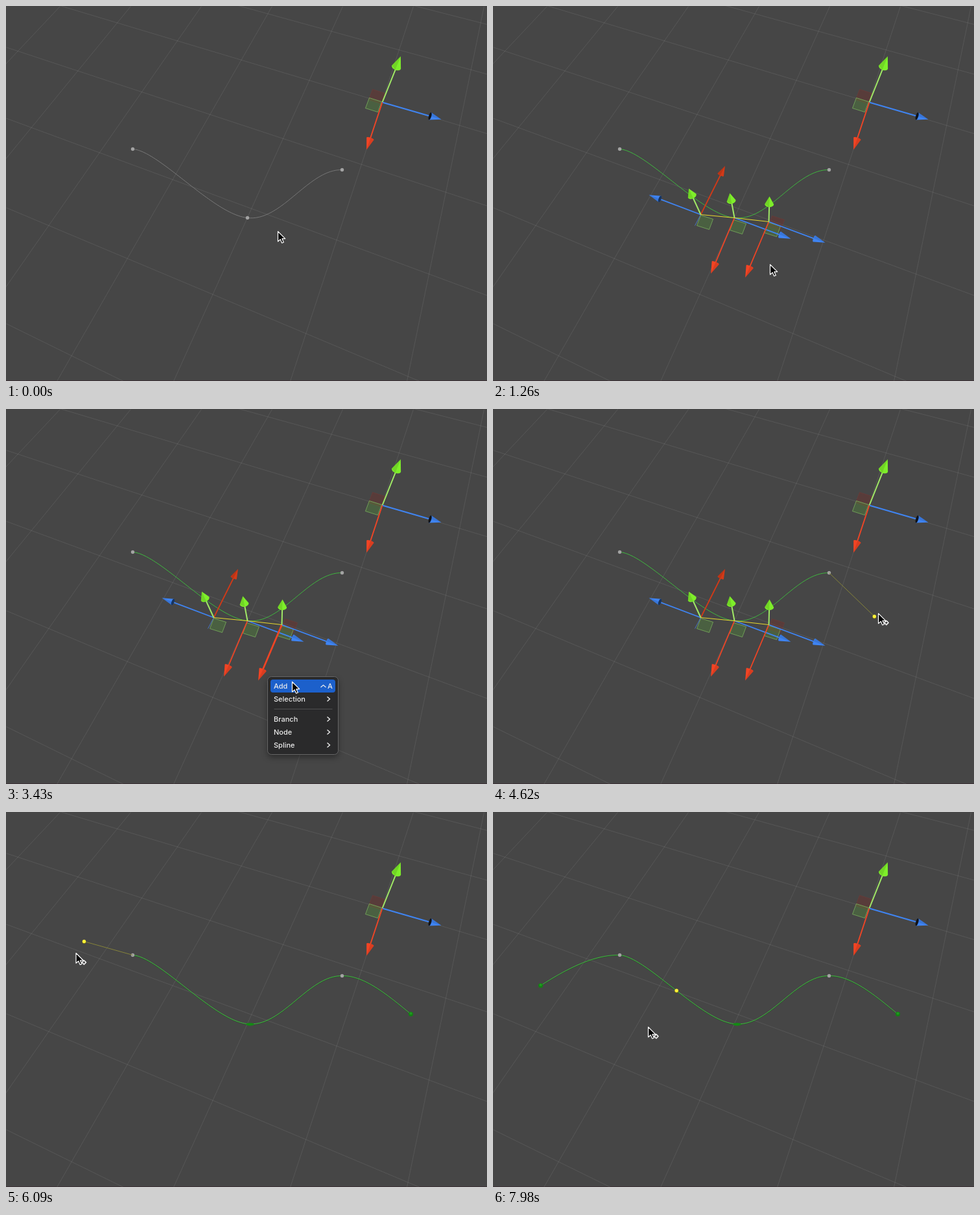
Animation, 742 px wide and 578 px high, one loop 8000 ms. Source, as an HTML page with a canvas:

```html
<!DOCTYPE html>
<html lang="en">
<head>
<meta charset="utf-8">
<title>Spline editor</title>
<style>
  html, body { margin: 0; width: 100%; height: 100%; overflow: hidden; background: #464646; }
  canvas { display: block; }
</style>
</head>
<body>
<canvas id="stage" width="742" height="578"></canvas>
<script>
const ctx = document.getElementById('stage').getContext('2d');
const LOOP = 8000, STEP = 70;
const SELECT = 1190, HOVER = 1610, MENU_OPEN = 2030, MENU_HOVER = 2520,
      ADD_MODE = 4060, ADD_END = 5250, ADD_START = 6650;
const GREEN = '#7eee2a', RED = '#f24424', BLUE = '#3f84f2';

// Spline nodes from left to right; the middle one shows its two tangent handles.
const first = [73, 267], left = [195, 220], middle = [372, 326], right = [518, 252], last = [624, 311];
const handleIn = [320, 321], handleOut = [425, 332];
const pieces = [
  [first, [112, 242], [155, 219], left],
  [left, [236, 223], handleIn, middle],
  [middle, handleOut, [466, 251], right],
  [right, [552, 251], [590, 283], last]
];

// Pointer moves: start, end, destination. Each one eases out.
const pointerStart = [419, 347];
const moves = [
  [0, 70, [423, 331]],
  [140, 490, [317, 261]],
  [490, 1050, [439, 402]],
  [1120, 1260, [427, 398]],
  [1470, 1680, [398, 396]],
  [2310, 2870, [441, 420]],
  [3570, 3780, [449, 421]],
  [3990, 4760, [599, 311]],
  [4760, 5110, last],
  [5530, 5880, [120, 199]],
  [6020, 6510, first],
  [6860, 7420, [288, 331]],
  [7420, 7980, [239, 331]]
];

const add = (p, q, scale = 1) => [p[0] + q[0] * scale, p[1] + q[1] * scale];
const distance = (p, q) => Math.hypot(p[0] - q[0], p[1] - q[1]);

function pointer(t) {
  let at = pointerStart;
  for (const [start, end, to] of moves) {
    if (t <= start) break;
    const rest = 1 - Math.min(1, (t - start) / (end - start));
    at = add(to, add(at, to, -1), rest * rest);
  }
  return at;
}

const visiblePieces = t => pieces.slice(t >= ADD_START ? 0 : 1, t >= ADD_END ? 4 : 3);

function bezier(piece, k) {
  const weights = [(1 - k) ** 3, 3 * k * (1 - k) ** 2, 3 * k * k * (1 - k), k ** 3];
  return piece.reduce((sum, p, i) => add(sum, p, weights[i]), [0, 0]);
}

function sampleSpline(t, perPiece = 60) {
  const visible = visiblePieces(t), points = [];
  for (let i = 0; i <= visible.length * perPiece; i++) {
    const n = Math.min(visible.length - 1, Math.floor(i / perPiece));
    points.push(bezier(visible[n], i / perPiece - n));
  }
  return points;
}

function path(points, closed) {
  ctx.beginPath();
  points.forEach(p => ctx.lineTo(...p));
  if (closed) ctx.closePath();
}

function line(points, color, width = 1) {
  path(points);
  ctx.strokeStyle = color;
  ctx.lineWidth = width;
  ctx.stroke();
}

function shape(points, fill, stroke, width = 1) {
  path(points, true);
  ctx.fillStyle = fill;
  ctx.fill();
  if (!stroke) return;
  ctx.strokeStyle = stroke;
  ctx.lineWidth = width;
  ctx.stroke();
}

function dot([x, y], color, rx = 2.7, ry = rx) {
  ctx.beginPath();
  ctx.ellipse(x, y, rx, ry, 0, 0, 7);
  ctx.fillStyle = color;
  ctx.fill();
}

// Two families of parallel ground lines in perspective.
function grid() {
  for (let i = 0; i < 7; i++) {
    line([[737 - 109 * i, 0], [618 - 180 * i, 578]], 'rgba(255,255,255,.085)');
    line([[0, 9275 / (i + 6.72) - 891], [742, 10685 / (i + 6.31) - 840]], 'rgba(255,255,255,.085)');
  }
}

function arrow(from, axis, color, { cone = 18, radius = 6, depth = 1.5, width = 1.8, cap, shaft = color } = {}) {
  const length = Math.hypot(...axis) + 1, base = length - cone;
  ctx.save();
  ctx.translate(...from);
  ctx.rotate(Math.atan2(axis[1], axis[0]));
  line([[0, 0], [base, 0]], shaft, width);
  ctx.beginPath();
  ctx.moveTo(length, 0);
  ctx.ellipse(base, 0, depth, radius, 0, Math.PI / 2, Math.PI * 1.5);
  ctx.closePath();
  ctx.fillStyle = color;
  ctx.fill();
  shape([[length, 0], [base, -radius], [base - depth, 0]], 'rgba(0,0,0,.1)');
  if (cap) dot([base, 0], cap, 2, radius);
  ctx.restore();
}

function plane(corner, fill, stroke) {
  const across = add(corner, [19, 6]), down = [-6, 16];
  shape([corner, across, add(across, down), add(corner, down)], fill, stroke);
}
const greenPlane = corner => plane(corner, 'rgba(82,140,58,.38)', 'rgba(125,180,95,.75)');
const redPlane = corner => plane(corner, 'rgba(135,35,30,.28)', 'rgba(150,50,45,.3)');

function upArrow(from, axis, cone, radius) {
  arrow(from, axis, GREEN, { cone, radius, depth: 4.5, width: 2, shaft: '#a0e866' });
}

function mainGizmo() {
  const origin = [580, 148];
  redPlane([565, 128]);
  greenPlane([560, 141]);
  upArrow(origin, [28, -70], 18, 7.5);
  arrow(origin, [90, 26], BLUE, { cap: '#10131a', width: 2 });
  arrow(origin, [-24, 72], RED);
}

function nodeGizmos(hovered) {
  const blueAxis = [86, 32], redAxis = [-36, 85];
  redPlane([430, 323]);
  [[320, 322], [371, 329], [424, 333]].forEach(greenPlane);
  line([handleIn, [311, 338]], '#4a76c4');
  arrow(handleIn, [37, -74], '#d23a18', { cone: 15, radius: 5.2 });
  arrow(handleIn, [-79, -30], BLUE, { radius: 5, cap: '#17345f' });
  for (const node of [middle, handleOut]) {
    arrow(node, redAxis, RED, { width: hovered && node === handleOut ? 2.7 : 1.7 });
    arrow(node, blueAxis, BLUE, { radius: 5.2 });
  }
  upArrow(handleIn, [-18, -39], 12, 7);
  upArrow(middle, [-7, -37], 12, 7);
  upArrow(handleOut, [1, -38], 12, 7);
  line([handleIn, middle, handleOut], '#e6d82e', 1.2);
}

function addedNode(p) {
  dot(p, '#128212', 3.5);
  dot(add(p, [0, -1]), '#1f9a1f', 2);
}

function spline(t, points) {
  if (t >= ADD_END) line(points.map(p => add(p, [0, 1])), 'rgba(10,110,10,.45)');
  line(points, t < SELECT ? '#777' : '#3fb83f');
  dot(left, '#a3a3a3');
  dot(right, '#a3a3a3');
  if (t < SELECT) dot(middle, '#a3a3a3');
  if (t >= ADD_END) {
    dot(add(middle, [4, .7]), '#148a14', 6, 2.3);
    addedNode(last);
  }
  if (t >= ADD_START) addedNode(first);
}

// The new node trails the pointer: snapped to the spline, or tied to its nearest end.
function preview(t, points) {
  let target = pointer(t - STEP);
  const nearest = points.reduce((a, b) => distance(b, target) < distance(a, target) ? b : a);
  if (nearest === points[0] || nearest === points[points.length - 1]) line([nearest, target], '#85833a');
  else target = nearest;
  dot(add(target, [0, .7]), 'rgba(120,110,0,.7)', 3);
  dot(target, '#fff238');
}

function panel(x, y, w, h, radius, fill) {
  ctx.beginPath();
  ctx.roundRect(x, y, w, h, radius);
  ctx.fillStyle = fill;
  ctx.fill();
}

function label(text, x, y) {
  ctx.font = '500 11px Inter, sans-serif';
  ctx.fillStyle = '#ececec';
  ctx.fillText(text, x, y);
}

function menu(hovered) {
  ctx.save();
  ctx.shadowColor = 'rgba(0,0,0,.4)';
  ctx.shadowBlur = 10;
  ctx.shadowOffsetY = 4;
  panel(403, 412, 109, 120, 6, '#2a2a2b');
  ctx.restore();
  ctx.strokeStyle = '#666';
  ctx.lineWidth = 1;
  ctx.stroke();
  if (hovered) panel(407.5, 416.5, 100, 20, 4, '#1c60cb');
  line([[413, 462], [503, 462]], '#505050');
  ['Add', 'Selection', 'Branch', 'Node', 'Spline'].forEach((text, i) => {
    const y = 430.5 + 20 * i + (i > 1 ? 11 : 0);
    label(text, 412.5, y);
    if (i) line([[495, y - 7.5], [499, y - 4], [495, y - .5]], '#ececec', 1.4);
    else {
      line([[485, y - 2], [489, y - 5.5], [493, y - 2]], '#ececec', 1.2);
      label('A', 495.5, y);
    }
  });
}

function cursor(t) {
  ctx.save();
  ctx.translate(...pointer(t));
  ctx.lineJoin = 'round';
  shape([[0, 0], [0, 15.5], [3.7, 12.2], [6.2, 17.8], [8.8, 16.7], [6.4, 11.2], [11.2, 11.2]], '#000', '#fff', 1.2);
  if (t >= ADD_MODE) {
    ctx.translate(12.3, 14.3);
    shape([[0, -3.2], [3.2, 0], [0, 3.2], [-3.2, 0]], '#fff', '#fff', 1.4);
    line([[-2, 0], [2, 0]], '#222', 1.1);
    line([[0, -2], [0, 2]], '#222', 1.1);
  }
  ctx.restore();
}

function draw(now) {
  const t = Math.floor(now % LOOP / STEP) * STEP;
  const points = sampleSpline(t);
  ctx.fillStyle = '#464646';
  ctx.fillRect(0, 0, 742, 578);
  ctx.fillStyle = '#3d3236';
  ctx.fillRect(0, 577, 742, 1);
  ctx.save();
  ctx.translate(.5, .5);
  grid();
  spline(t, points);
  mainGizmo();
  if (t >= SELECT && t < ADD_END) nodeGizmos(t >= HOVER && t < ADD_MODE);
  if (t >= ADD_MODE) preview(t, points);
  if (t >= MENU_OPEN && t < ADD_MODE) menu(t >= MENU_HOVER);
  cursor(t);
  ctx.restore();
}

const begin = performance.now();
function tick() {
  draw(performance.now() - begin);
  requestAnimationFrame(tick);
}
tick();
</script>
</body>
</html>
```
